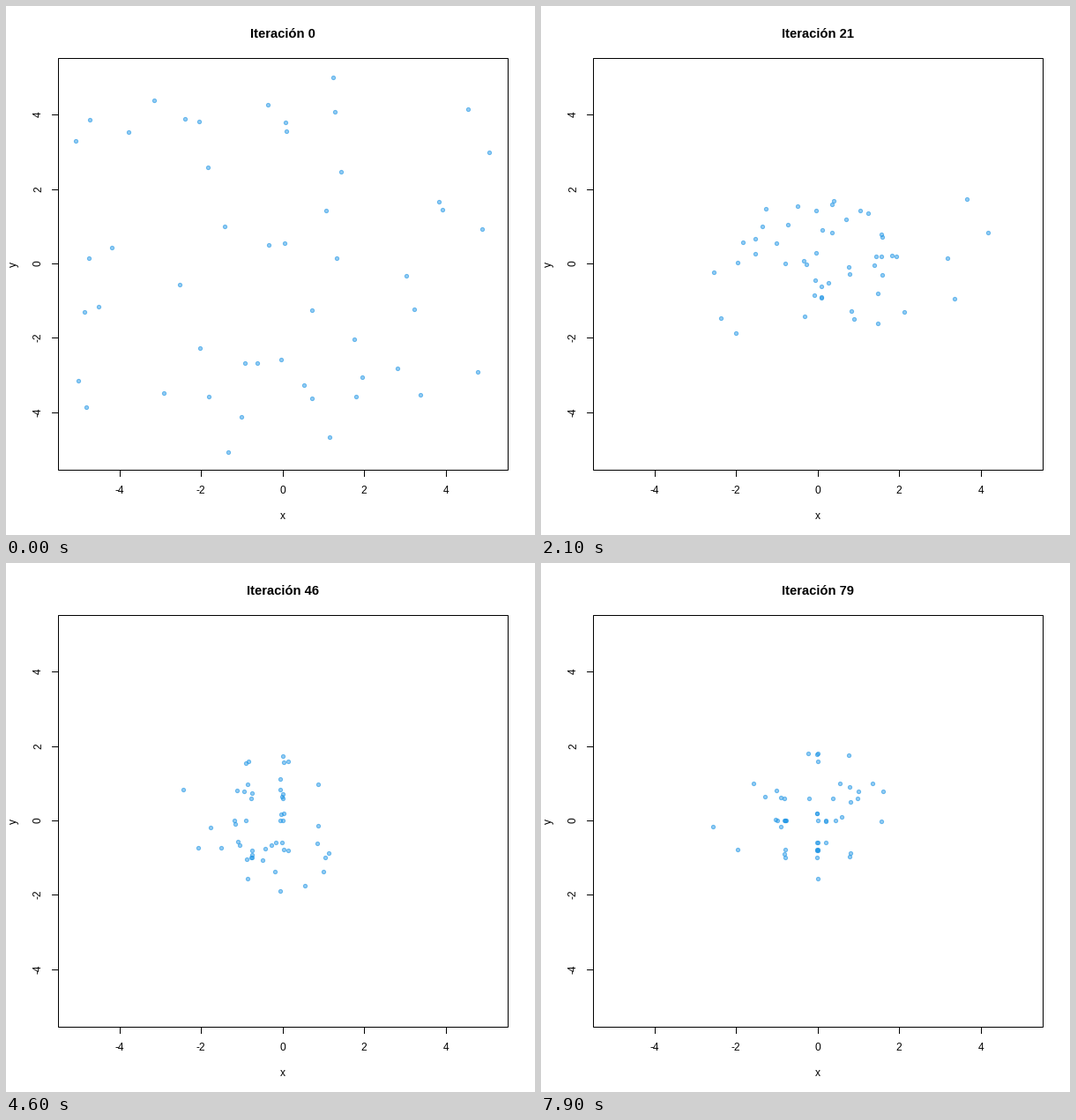
Recreate the animation shown at these times as a matplotlib script. Size 600 px wide and 600 px high, loop 8 s.

```python
import numpy as np
import matplotlib.pyplot as plt
from matplotlib.animation import FuncAnimation
from matplotlib.colors import to_rgba
from matplotlib.patches import Rectangle

FRAMES, INTERVAL = 80, 100
ORIGIN = np.array([314, 292.5])
SCALE = np.array([46.25, -42.2])
SIZE, LIMIT, F, CR = 50, 5.12, 0.8, 0.85
FILL, EDGE = to_rgba("#2297E6", 0.5), to_rgba("#2297E6", 0.6)


def to_pixels(pts):
    """Centre of the pixel that holds each data point."""
    return np.floor(ORIGIN + pts * SCALE + 1e-6) + 0.5


def rastrigin(pts):
    return np.sum(pts**2 - 10 * np.cos(2 * np.pi * pts) + 10, axis=1)


def evolve(steps, seed=7):
    """Differential evolution, local-to-best; returns the trials of each step."""
    rng = np.random.default_rng(seed)
    pop = rng.uniform(-LIMIT, LIMIT, (SIZE, 2))
    cost = rastrigin(pop)
    history = [pop]
    for _ in range(steps - 1):
        best = pop[cost.argmin()]
        trial = pop.copy()
        for i in range(SIZE):
            others = np.delete(np.arange(SIZE), i)
            a, b = rng.choice(others, 2, replace=False)
            mutant = pop[i] + F * (best - pop[i]) + F * (pop[a] - pop[b])
            j = rng.integers(2)
            trial[i, j] = mutant[j]
            if rng.random() < CR:
                trial[i, 1 - j] = mutant[1 - j]
        out = np.abs(trial) > LIMIT
        trial[out] = rng.uniform(-LIMIT, LIMIT, out.sum())
        trial_cost = rastrigin(trial)
        better = trial_cost <= cost
        pop = np.where(better[:, None], trial, pop)
        cost = np.where(better, trial_cost, cost)
        history.append(trial)
    return history


plt.rcParams["font.family"] = "Liberation Sans"
fig = plt.figure(figsize=(600 / 72, 600 / 72), dpi=72, facecolor="white")
ax = fig.add_axes([0, 0, 1, 1])
ax.set_xlim(0, 600)
ax.set_ylim(600, 0)
ax.axis("off")


def label(x, y, text, size=12, **kw):
    return ax.text(x, y, text, fontsize=size, ha="center", va="baseline", **kw)


def side_label(x, y, text):
    ax.text(x, y, text, fontsize=12, rotation=90, ha="right", va="center")


def line(x0, y0, x1, y1):
    ax.plot([x0, x1], [y0, y1], color="black", lw=1,
            solid_capstyle="butt", snap=False)


frame = Rectangle((59.5, 59.5), 510, 467, fill=False, ec="black", lw=1,
                  snap=False)
ax.add_patch(frame)
for v in range(-4, 5, 2):
    x, y = to_pixels(np.array([v, v]))
    line(x, 527, x, 534)
    line(52, y, 59, y)
    label(x - 0.5, 553, str(v))
    side_label(43, y - 0.5, str(v))
label(313.5, 582, "x")
side_label(15, 292.5, "y")

title = label(314, 36, "", 14.8, weight="bold")
trials = evolve(FRAMES)
dots = ax.scatter(*to_pixels(trials[0]).T, s=18, facecolors=[FILL] * SIZE,
                  edgecolors=[EDGE] * SIZE, linewidths=1, snap=False)
dots.set_clip_path(frame)


def draw(i):
    title.set_text(f"Iteración {i}")
    dots.set_offsets(to_pixels(trials[i]))
    return title, dots


anim = FuncAnimation(fig, draw, frames=FRAMES, interval=INTERVAL,
                     repeat=True, repeat_delay=0)
plt.show()
```
